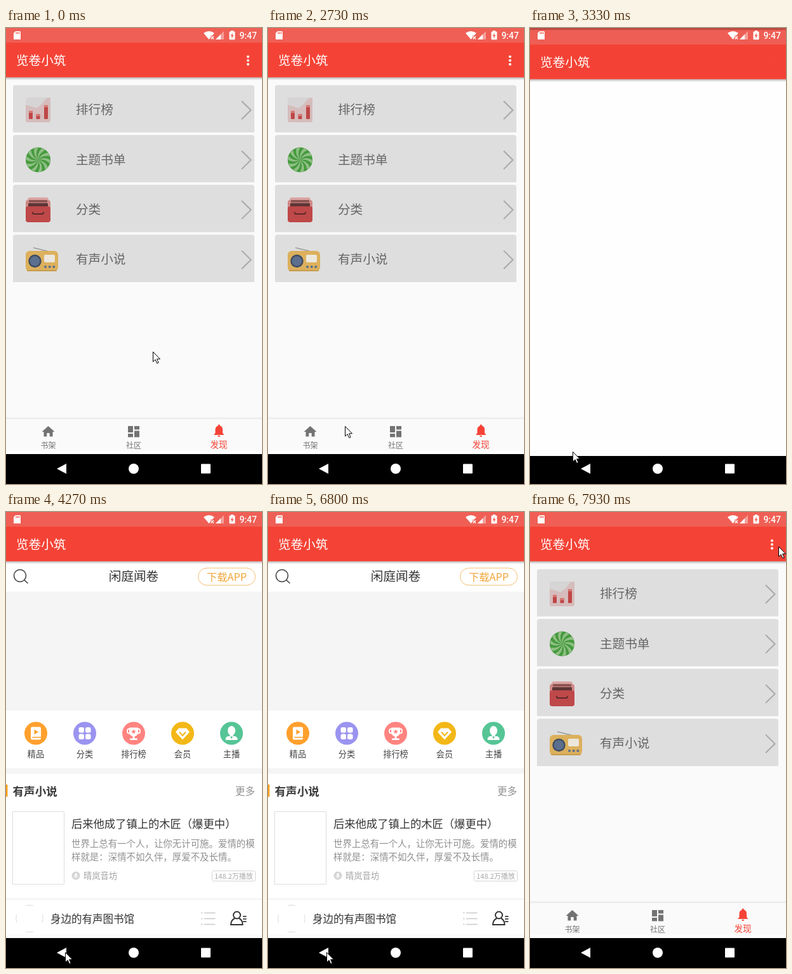
An HTML page with a canvas for the animation above (8000 ms loop, 403x716 px).

```html
<!DOCTYPE html>
<html lang="zh-CN">
<head>
<meta charset="utf-8">
<title>阅读应用</title>
<style>
html, body { margin: 0; width: 403px; height: 716px; overflow: hidden; background: #000; }
canvas { display: block; }
</style>
</head>
<body>
<canvas id="stage" width="403" height="716"></canvas>
<script>
const W = 403, H = 716, LOOP = 8000, STEP = 1000 / 15;
const CJK = '"Noto Sans CJK SC", "Noto Sans CJK", "Noto Sans", sans-serif';
const RED = '#f44336';
const stage = document.getElementById('stage').getContext('2d');
let c;

function layer(paint) {
  const cv = document.createElement('canvas');
  cv.width = W;
  cv.height = H;
  c = cv.getContext('2d');
  paint();
  return cv;
}
function rect(x, y, w, h, fill, r = 0) {
  c.beginPath();
  c.roundRect(x, y, w, h, r);
  c.fillStyle = fill;
  c.fill();
}
function frame(x, y, w, h, color, r = 0, lw = 1) {
  c.beginPath();
  c.roundRect(x, y, w, h, r);
  c.strokeStyle = color;
  c.lineWidth = lw;
  c.stroke();
}
function disc(x, y, r, fill) {
  c.beginPath();
  c.arc(x, y, r, 0, 7);
  c.fillStyle = fill;
  c.fill();
}
function ring(x, y, r, color, w) {
  c.beginPath();
  c.arc(x, y, r, 0, 7);
  c.strokeStyle = color;
  c.lineWidth = w;
  c.stroke();
}
function trace(pts) {
  c.beginPath();
  for (let i = 0; i < pts.length; i += 2) c.lineTo(pts[i], pts[i + 1]);
}
function poly(fill, ...pts) {
  trace(pts);
  c.closePath();
  c.fillStyle = fill;
  c.fill();
}
function line(color, w, ...pts) {
  trace(pts);
  c.strokeStyle = color;
  c.lineWidth = w;
  c.stroke();
}
function text(str, x, y, size, color, align = 'left', weight = 400) {
  c.font = `${weight} ${size}px ${CJK}`;
  c.textAlign = align;
  c.textBaseline = 'middle';
  c.fillStyle = color;
  c.fillText(str, x, y);
}
function shade(y, h, a0, a1) {
  const g = c.createLinearGradient(0, y, 0, y + h);
  g.addColorStop(0, `rgba(0,0,0,${a0})`);
  g.addColorStop(1, `rgba(0,0,0,${a1})`);
  rect(0, y, W, h, g);
}

function appBar() {
  rect(0, 0, W, 23, '#ef5f55');
  rect(0, 23, W, 54.5, RED);
  shade(77.5, 4.5, 0.26, 0);
  text('览卷小筑', 16, 51, 19.6, '#fff');
}

// Icons of the list
function chartIcon() {
  rect(31, 109, 39, 39, '#d6d4d4', 4);
  poly('#d6bcbc', 31, 121, 39, 123, 48, 126, 56, 120, 63, 111, 70, 109, 70, 146, 68, 148, 33, 148, 31, 146);
  for (const [x, y] of [[36, 130], [47.5, 135], [60, 121]]) {
    rect(x, y, 6, 143 - y, '#bf4646', 1);
    rect(x, y, 6, 3.5, '#d67a76', 1);
  }
}
function swirlIcon() {
  disc(50.5, 207, 19.5, '#459a3d');
  const at = (r, a) => [50.5 + r * Math.cos(a), 207 + r * Math.sin(a)];
  for (let i = 0; i < 10; i++) {
    const a = i * Math.PI / 5, b = a + Math.PI / 10;
    c.beginPath();
    c.moveTo(50.5, 207);
    c.quadraticCurveTo(...at(11, a - 0.5), ...at(19, a));
    c.arc(50.5, 207, 19, a, b);
    c.quadraticCurveTo(...at(11, b - 0.5), 50.5, 207);
    c.fillStyle = '#90bf85';
    c.fill();
  }
}
function drawerIcon() {
  rect(34, 266, 33, 16, '#dba5a2', 4);
  rect(31, 270, 39, 20, '#d08a88', 4);
  rect(36, 270, 29, 4, '#8e5553', 1);
  rect(35, 275, 31, 6, '#5d3635', 1);
  rect(31, 280, 39, 25, '#bf4849', 4);
  line('#5a2b2b', 2, 41.5, 289, 43, 292, 58, 292, 59.5, 289);
}
function radioIcon() {
  line('#9b9b9b', 1.8, 43, 345, 74, 352.5);
  rect(31, 350, 51, 32, '#dcb05c', 6);
  rect(33, 380, 47, 2, '#c89c4c', 1);
  disc(45.5, 366, 10.2, '#3f4c61');
  disc(45.5, 366, 7.8, '#5d6f8e');
  rect(60, 356, 17, 12, '#ece6dc', 2);
  for (const x of [62, 68.7, 75.3]) disc(x, 375, 2, '#5d6f8e');
}

function paintHome() {
  rect(0, 0, W, H, '#000');
  rect(0, 0, W, 669, '#fafafa');
  appBar();
  for (const y of [45, 51, 57]) disc(381, y, 2.1, '#fff');

  ['排行榜', '主题书单', '分类', '有声小说'].forEach((name, i) => {
    const y = 89.7 + i * 78.3;
    rect(11, y, 380, 74.3, '#dedede', [4, 4, 0, 0]);
    text(name, 110, y + 38.3, 19.6, '#666');
    line('#a8a8a8', 2, 371, y + 25, 385.5, y + 39.3, 371, y + 53.6);
  });
  chartIcon();
  swirlIcon();
  drawerIcon();
  radioIcon();

  shade(610, 4, 0, 0.08);
  rect(0, 614, W, 50, '#fafafa');
  rect(0, 664, W, 5, '#fdfdfd');
  const gray = '#737373';
  poly(gray, 66.5, 625, 76.5, 634, 73.5, 634, 73.5, 641.5, 68.7, 641.5, 68.7, 636, 64.3, 636, 64.3, 641.5, 59.5, 641.5, 59.5, 634, 56.5, 634);
  rect(192, 625, 8, 10, gray);
  rect(192, 637, 8, 5.5, gray);
  rect(202, 625, 8, 5.5, gray);
  rect(202, 632.5, 8, 10, gray);
  c.beginPath();
  c.moveTo(327, 639);
  c.lineTo(329.5, 636);
  c.lineTo(329.5, 630);
  c.bezierCurveTo(330, 622.5, 341, 622.5, 341, 630);
  c.lineTo(341, 636);
  c.lineTo(343.5, 639);
  c.fillStyle = RED;
  c.fill();
  disc(335.2, 624, 1.6, RED);
  c.beginPath();
  c.arc(335.2, 640, 2, 0, Math.PI);
  c.fill();
  text('书架', 66.5, 655, 12, gray, 'center');
  text('社区', 201, 655, 12, gray, 'center');
  text('发现', 335, 654, 13.6, RED, 'center');
}

function paintBlank() {
  rect(0, 0, W, H, '#000');
  rect(0, 0, W, 669, '#fff');
  appBar();
}

// White symbols inside the category discs
function bookSymbol(x, y) {
  rect(x - 8, y - 10, 16, 20, '#fff', 2);
  poly('#ffa02d', x - 2.5, y - 6, x + 4, y - 2, x - 2.5, y + 2);
  rect(x - 5.5, y + 5.5, 13.5, 1.5, '#ffa02d');
}
function gridSymbol(x, y) {
  for (const dx of [-9.5, 1]) for (const dy of [-9.5, 1]) rect(x + dx, y + dy, 8.5, 8.5, '#fff', 2.5);
}
function cupSymbol(x, y) {
  frame(x - 10, y - 7, 20, 7, '#fff', 3, 1.8);
  rect(x - 7, y - 9, 14, 14, '#fff', [1, 1, 7, 7]);
  rect(x - 1.5, y + 3, 3, 6, '#fff');
  rect(x - 6, y + 8, 12, 2.5, '#fff', 1);
  const star = [];
  for (let i = 0; i < 10; i++) {
    const r = i % 2 ? 1.8 : 4, a = i * Math.PI / 5 - Math.PI / 2;
    star.push(x + r * Math.cos(a), y - 2.5 + r * Math.sin(a));
  }
  poly('#ff8480', ...star);
}
function gemSymbol(x, y) {
  poly('#fff', x - 6, y - 8, x + 6, y - 8, x + 11, y - 2, x, y + 10, x - 11, y - 2);
  line('#f3b716', 2, x - 5, y - 2, x, y + 3.5, x + 5, y - 2);
}
function hostSymbol(x, y) {
  c.beginPath();
  c.ellipse(x, y - 4, 6, 7.5, 0, 0, 7);
  c.fillStyle = '#fff';
  c.fill();
  rect(x - 2.5, y, 5, 6, '#fff');
  rect(x - 9.5, y + 4.5, 19, 6, '#fff', [5, 5, 1, 1]);
  poly('#56c596', x - 2, y + 5, x + 2, y + 5, x, y + 9);
}

function paintTop() {
  ring(22, 100, 9.5, '#444', 1.6);
  line('#444', 1.6, 28.8, 106.8, 34.5, 112);
  text('闲庭闻卷', 201, 101, 19.6, '#333', 'center');
  frame(302.5, 88, 90, 27, '#f6bd70', 13.5);
  text('下载APP', 347.5, 101.5, 16.3, '#f2a63a', 'center');
  rect(0, 125, W, 187, '#f5f5f5');
}

function paintPage() {
  paintBlank();
  paintTop();
  [
    ['精品', '#ffa02d', bookSymbol],
    ['分类', '#9a94f0', gridSymbol],
    ['排行榜', '#ff8480', cupSymbol],
    ['会员', '#f3b716', gemSymbol],
    ['主播', '#56c596', hostSymbol]
  ].forEach(([name, color, symbol], i) => {
    const x = 47 + i * 77;
    disc(x, 347.5, 18, color);
    symbol(x, 347.5);
    text(name, x, 380, 13.2, '#444', 'center');
  });
  rect(0, 402, W, 9, '#f5f5f5');

  rect(0, 428, 2.5, 19, '#f9a11b');
  text('有声小说', 10.5, 438, 17.6, '#3a3a3a', 'left', 700);
  text('更多', 392, 438.5, 15.5, '#909090', 'right');
  frame(10.5, 470.5, 81, 114, '#ddd');
  text('后来他成了镇上的木匠（爆更中）', 103, 489, 17.3, '#333');
  text('世界上总有一个人，让你无计可施。爱情的模', 103, 520.5, 14.45, '#909090');
  text('样就是：深情不如久伴，厚爱不及长情。', 103, 541.5, 14.45, '#909090');
  disc(110, 571, 6.5, '#d4d4d4');
  rect(108.5, 567, 3, 5.5, '#fff', 1.5);
  line('#fff', 1, 107, 571, 108.5, 574, 111.5, 574, 113, 571);
  text('晴岚音坊', 122, 571, 13.3, '#a4a4a4');
  frame(324.5, 563.5, 68, 16, '#d4d4d4', 2);
  text('148.2万播放', 358.5, 572, 11, '#a8a8a8', 'center');

  rect(0, 607, W, 1.5, '#ececec');
  rect(0, 608.5, W, 55, '#fff');
  rect(0, 663.5, W, 5.5, '#fbfbfb');
  for (let i = 0; i < 4; i++) {
    const a = i * Math.PI / 2;
    c.beginPath();
    c.arc(37, 638.5, 21.3, a - 0.3, a + 0.3);
    c.strokeStyle = '#dcdcdc';
    c.lineWidth = 1;
    c.stroke();
  }
  text('身边的有声图书馆', 70, 639, 16.5, '#333');
  for (const y of [629.5, 638.5, 647.5]) {
    rect(307, y - 0.8, 2.5, 1.6, '#ccc');
    rect(312, y - 0.8, 17.5, 1.6, '#ccc');
  }
  ring(363.5, 633, 5.5, '#333', 2);
  c.beginPath();
  c.moveTo(360, 638);
  c.quadraticCurveTo(354, 641, 354, 648);
  c.lineTo(372.5, 648);
  c.quadraticCurveTo(372.5, 641, 367, 638);
  c.stroke();
  for (const y of [635, 639, 643]) rect(373, y - 0.8, 5.5, 1.7, '#333');
}

// System bar symbols stay in place above all pages
function paintSystem() {
  const white = '#fff';
  poly(white, 15, 5, 22, 5, 23, 6, 23, 18, 12, 18, 12, 8);
  for (const x of [15.5, 17.8, 20.1]) rect(x, 6.5, 1.2, 2.8, RED);
  c.beginPath();
  c.moveTo(311, 8);
  c.quadraticCurveTo(319.5, 2, 328, 8);
  c.lineTo(319.5, 18);
  c.fillStyle = white;
  c.fill();
  rect(322, 12, 6, 6, '#ef5f55');
  line(white, 1.4, 322.7, 13, 327, 17.5);
  line(white, 1.4, 327, 13, 322.7, 17.5);
  poly('rgba(255,255,255,.4)', 343, 5, 343, 18, 330, 18);
  poly(white, 338, 10, 338, 18, 330, 18);
  rect(354, 4, 4, 3, white);
  rect(351.5, 5.5, 9, 12.8, white, 1);
  poly('#ef5f55', 356.8, 7.5, 353.5, 12.8, 355.6, 12.8, 355.2, 16.5, 358.6, 11.2, 356.5, 11.2);
  c.font = '500 14px Roboto, "Noto Sans", sans-serif';
  c.textAlign = 'right';
  c.textBaseline = 'alphabetic';
  c.fillStyle = white;
  c.fillText('9:47', 395, 17);

  poly(white, 80, 692, 95, 684, 95, 700);
  disc(201, 692, 8, white);
  rect(307, 684.5, 15, 15, white, 1);
}

const home = layer(paintHome);
const blank = layer(paintBlank);
const partial = layer(() => { paintBlank(); paintTop(); });
const page = layer(paintPage);
const system = layer(paintSystem);

// Pointer path: time, x, y
const PATH = [
  [0, 231, 508], [300, 208, 614], [500, 199, 540], [800, 231, 398], [867, 231, 398],
  [1000, 236, 377], [1267, 236, 377], [1600, 216, 419], [2133, 167, 535],
  [2733, 121, 625], [3000, 77, 652], [3333, 67, 665], [3867, 86, 685], [3933, 93, 691],
  [5200, 93, 691], [5266, 92, 691], [7180, 92, 691], [7533, 380, 168], [7933, 391, 54], [LOOP, 391, 54]
];
function pointer(t) {
  const i = PATH.findIndex(p => p[0] > t);
  const [t0, x0, y0] = PATH[i - 1], [t1, x1, y1] = PATH[i];
  const k = (t - t0) / (t1 - t0);
  c.save();
  c.translate(Math.round(x0 + (x1 - x0) * k) + 0.5, Math.round(y0 + (y1 - y0) * k) + 0.5);
  poly('#fff', 0, 0, 0, 15.5, 3.6, 12.2, 6.2, 18, 8.6, 17, 6.1, 11.3, 11, 11.3);
  c.strokeStyle = '#000';
  c.lineWidth = 1;
  c.stroke();
  c.restore();
}

const OPEN = 3178, CLOSE = 6985, DROP = 57;
const part = (t, start, len) => Math.min(1, Math.max(0, (t - start) / len));

function show(img, y, alpha) {
  c.globalAlpha = alpha;
  c.drawImage(img, 0, y);
  c.globalAlpha = 1;
}

function draw(t) {
  c = stage;
  rect(0, 0, W, H, '#000');
  let bright = 1, alpha = 0, y = 0;
  if (t >= CLOSE) {
    const k = part(t, CLOSE, 250);
    bright = 1 - 0.3 * (1 - k) ** 3;
    y = DROP * k ** 4;
    alpha = 1 - part(t, CLOSE + 100, 150);
  } else if (t >= OPEN) {
    bright = 1 - 0.3 * part(t, OPEN, 217);
    y = DROP * (1 - part(t, OPEN, 350)) ** 5;
    alpha = 1 - (1 - part(t, OPEN, 200)) ** 4;
  }
  show(home, 0, bright);
  if (alpha > 0) show(t < 3930 ? blank : t < 4190 ? partial : page, Math.round(y), alpha);
  c.drawImage(system, 0, 0);
  pointer(t);
}

// The picture advances in fixed steps, fifteen per second
function tick(now) {
  const t = now % LOOP;
  draw(Math.floor((t + 5) / STEP) * STEP % LOOP);
  requestAnimationFrame(tick);
}
requestAnimationFrame(tick);
</script>
</body>
</html>
```
